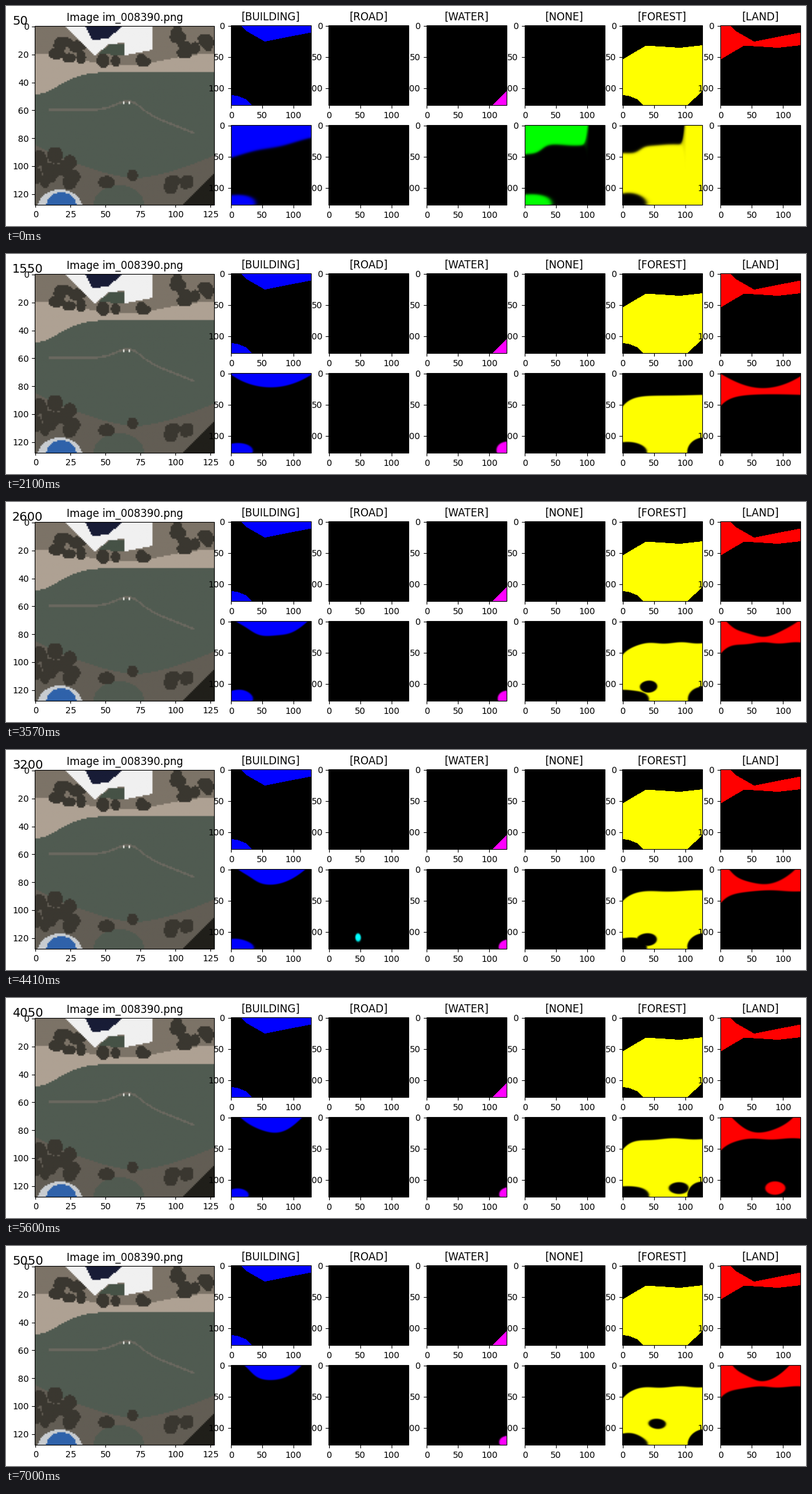
These frames come from a looping animation (1280 px wide and 353 px high, 7070 ms). A matplotlib script:

```python
import matplotlib.pyplot as plt
import numpy as np
from matplotlib.animation import FuncAnimation
from matplotlib.collections import LineCollection
from matplotlib.patches import Rectangle
from matplotlib.path import Path

W, H, DPI, N = 1280, 353, 100, 128
FRAMES, STEP_MS = 101, 70
FAR = 12.0
PT = DPI / 72

plt.rcParams["font.family"] = "DejaVu Sans"

x = np.arange(N) + 0.5
X, Y = np.meshgrid(x, x)
GRID = np.column_stack([X.ravel(), Y.ravel()])

CLASSES = {
    "BUILDING": (0, 0, 1), "ROAD": (0, 1, 1), "WATER": (1, 0, 1),
    "NONE": (0, 1, 0), "FOREST": (1, 1, 0), "LAND": (1, 0, 0),
}


def inside(*points):
    return Path(points).contains_points(GRID).reshape(N, N)


def blob(cx, cy, rx, ry, size=1.0):
    """Rough signed distance to an ellipse; it shrinks away as size drops to 0."""
    d = (1 - np.hypot((X - cx) / rx, (Y - cy) / ry)) * min(rx, ry)
    return d - 2 * FAR * (1 - size)


def below(edge):
    """Signed distance below the curve y = edge(x)."""
    return (Y - edge) / np.hypot(1, np.gradient(edge))


def ramp(v):
    return 1 / (1 + np.exp(-v))


# ---- aerial view, reduced to flat shapes ----

def aerial(seed=4):
    rng = np.random.default_rng(seed)
    img = np.empty((N, N, 3))
    img[:] = 80, 91, 81

    def trees(count, left, right, mid, spread):
        for _ in range(count):
            cx, cy = rng.uniform(left, right), mid + rng.uniform(-spread, spread)
            img[blob(cx, cy, *rng.uniform(3, 6, 2)) > 0] = 58, 55, 48

    # sand belt, garden and buildings
    img[Y < 33 + 16 * np.exp(-(x / 24) ** 2)] = 174, 161, 147
    img[Y < 24 - 4 * np.cos(x / 20)] = 124, 115, 103
    trees(7, 2, 34, 14, 10)
    trees(9, 88, 126, 11, 9)
    trees(5, 46, 84, 24, 2)
    img[inside((22, 0), (84, 0), (84, 17), (64, 21), (64, 12), (53, 13),
               (43, 21))] = 240, 240, 240
    img[inside((36, 0), (63, 0), (52, 9), (41, 10))] = 24, 28, 54
    img[inside((45, 20), (54, 13), (64, 13), (64, 21))] = 70, 82, 70
    # footpath across the meadow
    path = 60 - 6 * np.exp(-((x - 66) / 12) ** 2) + 0.4 * np.maximum(0, x - 72)
    img[(abs(Y - path) < 0.8) & (abs(X - 62) < 52)] = 106, 104, 95
    for dot in (63.5, 67.5):
        img[blob(dot, 55, 1, 1) > 0] = 235, 235, 230
    # lower bank, lawn, pool and dark corner
    bank = 109 - 20 * (abs(x - 72) / 64) ** 1.5
    img[Y > bank] = 98, 93, 84
    img[blob(60, 128, 18, 14) > 0] = 80, 90, 80
    trees(18, 0, 30, 101, 11)
    trees(6, 50, 112, 109, 8)
    img[blob(18, 130, 16, 13) > 0] = 200, 204, 208
    img[blob(19, 130, 11, 11) > 0] = 47, 98, 170
    img[X + Y > 233] = 32, 31, 26
    return img / 255


# ---- ground truth ----

SHORE = [(33, 128), (25, 119), (10, 113), (0, 112)]
LEDGE = [(128, 32), (92, 36), (38, 32.5), (0, 55)]
ROOF = [(15, 0), (26, 10), (54, 26), (128, 11.5)]
EMPTY = np.zeros((N, N))
TRUTH = [
    inside(*ROOF, (128, 0)) | inside(*SHORE, (0, 128)),
    EMPTY,
    X + Y > 233,
    EMPTY,
    inside(*LEDGE, *SHORE[::-1], (104, 128), (128, 106)),
    inside((0, 0), *ROOF, *LEDGE),
]

# wandering gap in the forest: step, x, y, size, how much land claims it
GAP = np.array([
    (0, 44, 83, 0, 0), (15, 40, 86, 1, 1), (30, 44, 90, 0, 0), (40, 43, 97, 0.9, 0),
    (63, 40, 114, 1, 0), (80, 89, 114, 1, 1), (100, 55, 94, 0.95, 0),
]).T


# ---- predictions ----

def predict(i):
    t = i / (FRAMES - 1)
    early = np.exp(-i / 3)
    v = (x - 66) / 60

    # the roof line bends into an arc, the forest line settles on a flat ledge
    roof = 25 - 5 * np.exp(-i / 25) - 42 * t ** 0.7 * v ** 2 + early * (16 - 14 * v)
    first = 32 + 14 * ramp((28 - x) / 5) - 90 * ramp((x - 102) / 2)
    ridge = early * first + (1 - early) * (35 + 19 * np.exp(-x / 15))

    gx, gy, size, claim = (np.interp(i, GAP[0], row) for row in GAP[1:])
    gap = blob(gx, gy, 16, 10, size)
    corner = blob(130, 126, 25, 22, 1 - early)
    forest = np.minimum.reduce(
        [below(ridge), -blob(10, 126, 31, 16), -corner, -gap])

    annex = early + (1 - early) * np.sin(np.pi * t) ** 0.4
    building = np.maximum(-below(roof), blob(10, 125, 27, 14, annex))

    band = np.minimum(below(roof), -below(ridge))
    land = np.maximum(band, gap - 2 * FAR * (1 - claim)) - 2 * FAR * early

    r = 14 + 7 * np.exp(-(i / 36) ** 4)
    water = blob(129, 124, r, 0.8 * r, 1 - early)
    pulse = max(0, np.cos(2 * np.pi * (i - 15) / 48)) ** 8
    road = blob(2 + 0.94 * (i - 15), 96 + 0.27 * (i - 15), 5, 7, pulse)
    none = np.clip(-forest, -FAR, FAR) - 2 * FAR * (1 - early)

    # training jitter, new on every step
    rng = np.random.default_rng(i)
    a, b, phase = rng.uniform(0, 2 * np.pi, 3)
    jitter = np.sin(X / 50 * a + Y / 50 * b + phase)
    fields = np.array([building, road, water, none, forest, land])
    return ramp(np.clip(fields + jitter, -FAR, FAR) / (0.5 + 0.6 * early))


# ---- stage ----

fig = plt.figure(figsize=(W / DPI, H / DPI), dpi=DPI, facecolor="white")
ax = fig.add_axes([0, 0, 1, 1])
ax.set_axis_off()
ticks = []


def panel(img, left, top, size, xticks, yticks, title=None, **kw):
    right, bottom = left + size, top + size
    im = ax.imshow(img, extent=(left, right, bottom, top), aspect="auto",
                   vmin=0, vmax=1, **kw)
    ax.add_patch(Rectangle((left, top), size, size, fill=False, lw=0.8, zorder=3))
    scale, tick, pad = size / N, 3.5 * PT, 7 * PT
    for v in xticks:
        px = left + (v + 0.5) * scale
        ticks.append([(px, bottom), (px, bottom + tick)])
        ax.text(px, bottom + pad, str(v), fontsize=10, ha="center", va="top")
    for v in yticks:
        py = top + (v + 0.5) * scale
        ticks.append([(left - tick, py), (left, py)])
        ax.text(left - pad, py, str(v), fontsize=10, ha="right",
                va="center_baseline")
    if title:
        ax.text(left + size / 2, top - 6 * PT, title, fontsize=12, ha="center")
    return im


def tint(mask, color):
    return mask[..., None] * np.array(color, float)


panel(aerial(), 46.3, 31.8, 286.8, range(0, 126, 25), range(0, 121, 20),
      "Image im_008390.png")
outputs = []
for n, (name, color) in enumerate(CLASSES.items()):
    left, marks = 359.65 + 156.65 * n, (0, 50, 100)
    panel(tint(TRUTH[n], color), left, 31.1, 127.9, marks, marks, f"[{name}]",
          interpolation="nearest")
    outputs.append(panel(tint(EMPTY, color), left, 191.3, 127.9, marks, marks,
                         interpolation="nearest"))
ax.add_collection(LineCollection(ticks, colors="black", linewidths=0.8, zorder=3))
counter = ax.text(10, 30, "", fontsize=14)
ax.set(xlim=(0, W), ylim=(H, 0))


def draw(i):
    counter.set_text(str(50 * (i + 1)))
    for im, p, color in zip(outputs, predict(i), CLASSES.values()):
        im.set_data(tint(p, color))
    return [counter, *outputs]


anim = FuncAnimation(fig, draw, frames=FRAMES, interval=STEP_MS, repeat=True)
plt.show()
```
